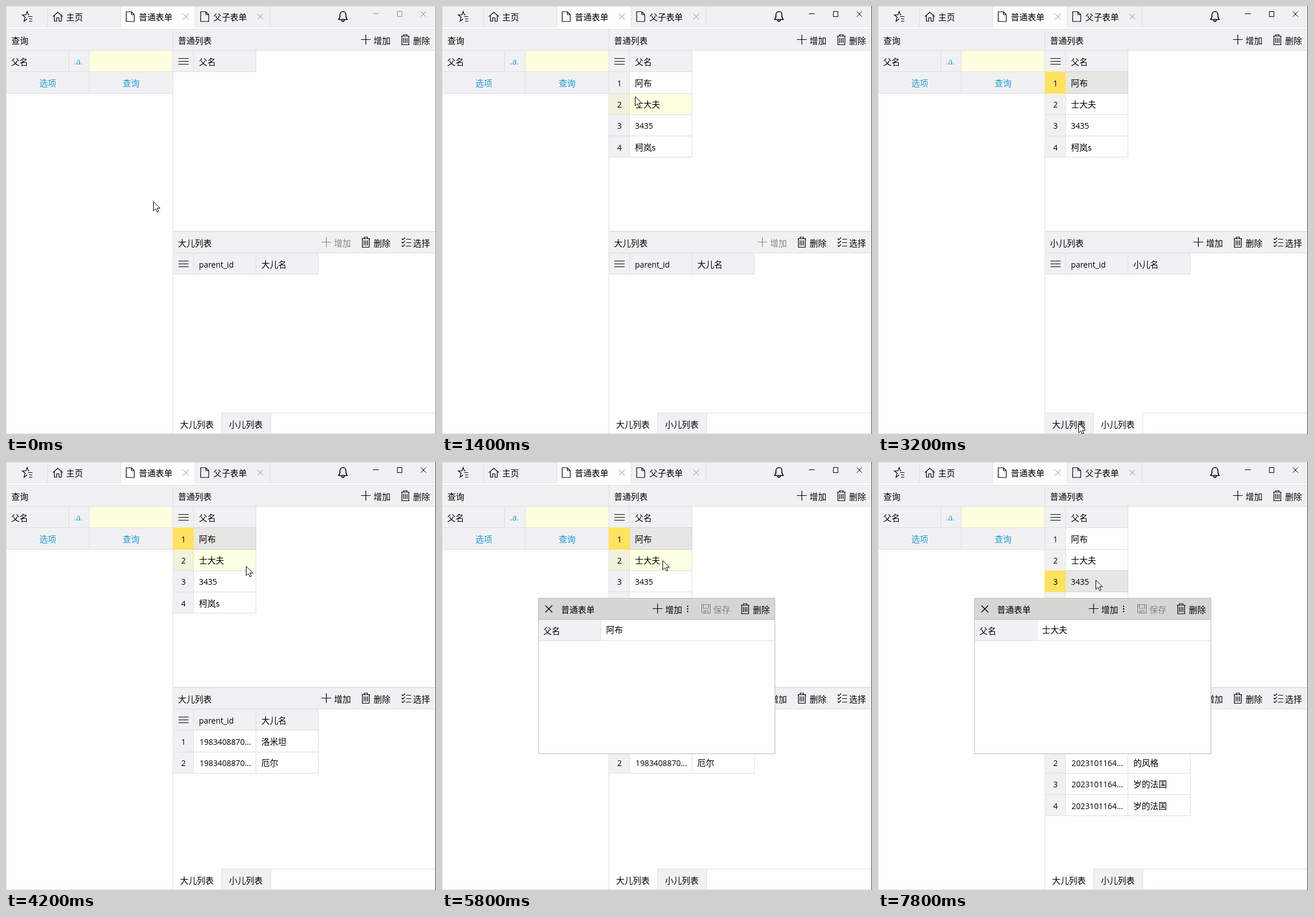
Write an HTML page that moves like this. It is 751 by 746 pixels and loops after 8000 ms.

```html
<!DOCTYPE html>
<html lang="zh-CN">
<head>
<meta charset="utf-8">
<title>表单</title>
<style>
html, body { margin: 0; width: 100%; height: 100%; overflow: hidden; background: #fefefe; }
svg { display: block; width: 751px; height: 746px; }
text { font: 14.67px "Noto Sans CJK SC", "Noto Sans CJK", sans-serif; white-space: pre; }
.latin { font: 13.8px "Open Sans", "Noto Sans", sans-serif; }
</style>
</head>
<body>
<svg id="stage" viewBox="0 0 751 746"></svg>
<script>
const LOOP = 8000;
const PANEL = '#f1f1f4', EDGE = '#dfdfe1', WHITE = '#fefefe', INK = '#000', BLUE = '#1f9bcf';
const PALE = '#ffffe1', PALE_PANEL = '#f2f1dc', DIM = '#858585';
const ROW = 37.2, LIST_TOP = 114.4, CHILD_TOP = 467.4;
const LEFT = 291, COL1 = 327, COL2 = 436, COL3 = 545;

const box = (x, y, r, b, fill, stroke = EDGE) =>
  `<rect x="${x + .5}" y="${y + .5}" width="${r - x}" height="${b - y}" fill="${fill}" stroke="${stroke}"/>`;
const path = (d, color = INK, width = 1.2, fill = 'none') =>
  `<path d="${d}" fill="${fill}" stroke="${color}" stroke-width="${width}"/>`;
const at = (x, y, content) => `<g transform="translate(${x} ${y})">${content}</g>`;
const text = (x, y, s, color = INK, anchor = 'start') => {
  const latin = /^[\x20-\x7e]+$/.test(s) ? ' class="latin"' : '';
  return `<text x="${x}" y="${Math.round(y)}" fill="${color}" text-anchor="${anchor}"${latin}>${s}</text>`;
};

// Icons; each is placed by its centre.
const plus = (x, y, c = INK) => at(x, y, path('M-8.5 0H8.5M0-8.5V8.5', c));
const cross = (x, y, r, c = INK, w = 1.2) => at(x, y, path(`M${-r} ${-r}L${r} ${r}M${r} ${-r}L${-r} ${r}`, c, w));
const trash = (x, y) => at(x, y, path('M-7.5-6H7.5M-3-6V-8.5H3V-6M-6-6V9H6V-6M-3-3V6M0-3V6M3-3V6'));
const menu = (x, y) => at(x, y, path('M-9-5H9M-9 0H9M-9 5H9'));
const page = (x, y) => at(x, y, path('M-7-8.5H2L7-3.5V8.5H-7ZM2-8.5V-3.5H7'));
const checks = (x, y) => at(x, y, path('M-8-6L-6-4-2-8M-8 0L-6 2-2-2M-8 6L-6 8-2 4M0-5H8.5M0 1H8.5M0 7H8.5'));
const save = (x, y) => at(x, y, path('M-7.5-7.5H7.5V7.5H-5.5L-7.5 5.5ZM-4.5-7.5V-1H4.5V-7.5M-3.5 7.5V3H3.5V7.5M-1 4V7', DIM));
const star = at(37, 18.5, path('M4-3H2L0-9-2.2-3H-8.5L-3.5 1-5.5 8 0 4M1.5 0H9M3 4H9M3 8H9'));
const home = at(90.5, 18.5, path('M-8.5 0L0-7.8 8.5 0M-6-2V8H-2V2H2V8H6V-2'));
const bell = at(588.5, 18, path('M-7.5 5.5H7.5L5.2 1V-3C5.2-10-5.2-10-5.2-3V1ZM-2.5 6.5C-2 9.5 2 9.5 2.5 6.5', INK, 1.6));
const arrow = 'M0 0V16L3.8 12.4 6.5 18 9 17 6.5 11.4H11.6Z';

const tab = (l, r, label, fill) =>
  box(l, 0, r, 36, fill) + page(l + 17, 18.5) + text(l + 32, 24.5, label) + cross(l + 114, 18.5, 5, '#b9b9b9');

const titleBar = (l, r, y, title) => box(l, y, r, y + 37, PANEL) + text(l + 9.5, y + 25.5, title);

const shell =
  box(0, 0, 750, 745, WHITE) + box(0, 0, 750, 36, PANEL) + box(0, 0, 72, 36, PANEL) + star +
  home + text(105, 24.5, '主页') + tab(200, 330, '普通表单', WHITE) + tab(330, 461, '父子表单', PANEL) + bell +
  path('M201 36.5H330', WHITE, 1) + box(0, 40, LEFT, 745, WHITE) + titleBar(0, LEFT, 40, '查询') +
  box(0, 77, 109, 114, PANEL) + text(9, 103, '父名') +
  box(109, 77, 145, 114, PANEL) + text(126.5, 102, '.a.', BLUE, 'middle') + box(145, 77, LEFT, 114, '#ffffe0') +
  box(0, 114, 145, 152, PANEL) + text(73, 140, '选项', BLUE, 'middle') +
  titleBar(LEFT, 750, 40, '普通列表') + plus(628.5, 58.5) + text(642, 65.5, '增加') +
  trash(697.5, 58.5) + text(711, 65.5, '删除') +
  box(LEFT, 77, COL1, 114, PANEL) + menu(310, 96.5) + box(COL1, 77, COL2, 114, PANEL) + text(337, 103, '父名');

const names = ['阿布', '士大夫', '3435', '柯岚s'];
const childLists = [
  { id: '1983408870...', names: ['洛米坦', '厄尔'] },
  { id: '2023101164...', names: ['的风格', '的风格', '岁的法国', '岁的法国'] }
];

// Pointer stops: time, x, y; each holds until the next.
const stops = [
  [0, 257, 341], [200, 250, 300], [400, 232, 200], [600, 220, 133], [1200, 290, 148],
  [1400, 337, 158], [1600, 350, 138], [2000, 390, 455], [2200, 429, 562], [2400, 428, 668],
  [2600, 424, 728], [3200, 350, 728], [3600, 400, 234], [3800, 415, 215], [4000, 420, 195],
  [4200, 419, 182], [4400, 400, 150], [4600, 392, 136], [5200, 397, 185], [5400, 390, 176],
  [5600, 385, 172], [6400, 380, 198], [6600, 380, 206], [6800, 376, 240], [7000, 374, 273],
  [7200, 380, 206]
];

const inside = ([, x, y], l, t, r, b) => x >= l && x < r && y >= t && y < b;

// Edges and text baseline of row i in a list that begins at start.
function rowAt(start, i) {
  const y = start + ROW * i;
  return { top: Math.round(y), bottom: Math.round(y + ROW), base: y + 25.6 };
}

function parentList(t, stop) {
  if (t < 1000) return '';
  const selected = t < 1800 ? -1 : t < 6200 ? 0 : t < 6600 ? 1 : 2;
  const rows = names.map((name, i) => {
    const { top, bottom, base } = rowAt(LIST_TOP, i);
    const hover = inside(stop, LEFT, top, COL2, bottom) && !(t >= 5000 && stop[2] > 237);
    const chosen = i === selected;
    const cells = chosen
      ? box(COL1, top, COL2, bottom, '#e6e6e4', '#cfcfcd') + box(LEFT, top, COL1, bottom, '#ffe25f', '#ffe25f')
      : box(LEFT, top, COL1, bottom, hover ? PALE_PANEL : PANEL) + box(COL1, top, COL2, bottom, hover ? PALE : WHITE);
    return { chosen, svg: cells + text(310, base, String(i + 1), INK, 'middle') + text(337, base, name) };
  });
  // The chosen row goes last so that its border stays whole.
  return rows.sort((a, b) => a.chosen - b.chosen).map(row => row.svg).join('');
}

function childPanel(t, stop, previous) {
  const younger = t >= 2800 && t < 3400;
  const label = younger ? '小儿' : '大儿';
  const tone = t < 1800 ? DIM : INK;
  const headHover = [stop, previous].some(s => inside(s, COL1, 430, COL2, 467));
  let out = titleBar(LEFT, 750, 393, label + '列表') + path('M291.5 393H750', '#d2d2d5', 1) +
    plus(559.5, 411.5, tone) + text(573, 418.5, '增加', tone) + trash(628.5, 411.5) + text(642, 418.5, '删除') +
    checks(699, 411.5) + text(711, 418.5, '选择') +
    box(LEFT, 430, COL1, 467, PANEL) + menu(310, 449.5) +
    box(COL1, 430, COL2, 467, headHover ? '#ffffc8' : PANEL) + text(337, 455.5, 'parent_id') +
    box(COL2, 430, COL3, 467, PANEL) + text(446, 456, label + '名');
  if (t >= 1800 && !younger) {
    const list = childLists[t < 7400 ? 0 : 1];
    list.names.forEach((name, i) => {
      const { top, bottom, base } = rowAt(CHILD_TOP, i);
      const hover = inside(stop, LEFT, top, COL3, bottom) && t < 5000;
      const fill = hover ? PALE : WHITE;
      out += box(LEFT, top, COL1, bottom, hover ? PALE_PANEL : PANEL) + text(310, base, String(i + 1), INK, 'middle') +
        box(COL1, top, COL2, bottom, fill) + text(338, base, list.id) +
        box(COL2, top, COL3, bottom, fill) + text(446, base, name);
    });
  }
  const [l, r] = younger ? [376, 462] : [LEFT, 376];
  return out + box(LEFT, 709, 376, 745, younger ? PANEL : WHITE) + box(376, 709, 462, 745, younger ? WHITE : PANEL) +
    path('M462 709.5H750', EDGE, 1) + path(`M${l + 1} 709.5H${r}`, WHITE, 1) +
    text(304, 734.5, '大儿列表') + text(389.5, 734.5, '小儿列表');
}

function dialog(t) {
  if (t < 5000) return '';
  return box(168, 237, 581, 508, WHITE, '#bcbcbc') + box(168, 237, 581, 274, '#d6d6d4', '#bcbcbc') +
    cross(186.5, 256, 6, INK, 1.4) + text(208, 262.5, '普通表单') +
    plus(376.5, 255.5) + text(390, 262.5, '增加') + path('M429 250.5V252.5M429 255V257M429 259.5V261.5', INK, 2.2) +
    save(461, 256) + text(474, 262.5, '保存', DIM) + trash(529.5, 255.5) + text(543, 262.5, '删除') +
    `<path d="M169 275H277V311H169Z" fill="${PANEL}"/>` + path('M169 311.5H581M277.5 275V311', EDGE, 1) +
    text(177, 300, '父名') + text(286.5, 298, names[t < 7400 ? 0 : 1]);
}

function scene(t) {
  const index = stops.findLastIndex(s => s[0] <= t);
  const stop = stops[index], previous = stops[Math.max(0, index - 1)];
  const active = t >= 600;
  const frame = active ? INK : '#8c8c8c';
  const queryHover = inside(stop, 146, 115, LEFT, 152);
  return shell +
    path('M641 13.5H651M683.5 9.5H691.5V18.5H683.5Z', frame, 1) + cross(729, 14, 4.6, frame, 1) +
    box(145, 114, LEFT, 152, queryHover ? PALE_PANEL : PANEL) + text(218.5, 140, '查询', BLUE, 'middle') +
    parentList(t, stop) + childPanel(t, stop, previous) + path('M750.5 0V746', active ? '#4a4a4a' : '#8f8f8f', 1) +
    dialog(t) + at(stop[1] + .5, stop[2], path(arrow, INK, 1, '#fff'));
}

const stage = document.getElementById('stage');
const start = performance.now();
let shown = -1;
function draw(now) {
  const t = Math.floor(Math.max(0, now - start) % LOOP / 200) * 200;
  if (t !== shown) {
    stage.innerHTML = scene(t);
    shown = t;
  }
  requestAnimationFrame(draw);
}
draw(start);
</script>
</body>
</html>
```
